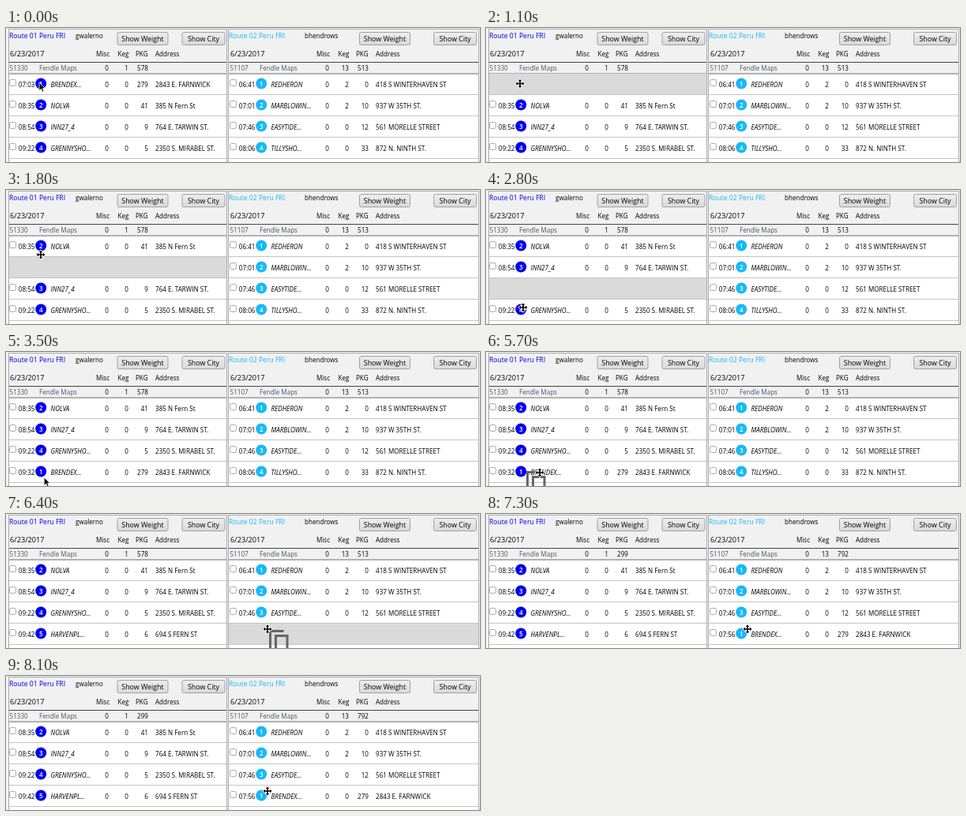
Recreate the animation shown at these times as an HTML page. Size 600 by 170 pixels, loop 8.2 s.

```html
<!DOCTYPE html>
<html lang="en">
<head>
<meta charset="utf-8">
<title>Route planner</title>
<style>
html, body { margin: 0; width: 100%; height: 100%; overflow: hidden; background: #fff; }
svg { display: block; font: 8.1px "Open Sans", "Noto Sans", sans-serif; fill: #000; }
.title { font-size: 8.6px; }
.button { font-size: 8.9px; }
.date { font-size: 9.2px; }
.sum { fill: #4b5560; }
.name { font-style: italic; }
.badge { font-size: 8px; font-weight: 600; fill: #fff; }
</style>
</head>
<body>
<svg id="stage" width="600" height="170" viewBox="0 0 600 170">
  <defs>
    <linearGradient id="face" x2="0" y2="1">
      <stop stop-color="#efefef"/><stop offset="1" stop-color="#d8d8d8"/>
    </linearGradient>
  </defs>
  <g id="view"></g>
</svg>
<script>
const LOOP = 8200, STEP = 100, ROW = 27, TOP = 58;
const view = document.getElementById('view');

// badge, name, packages, address, kegs
const stops = {
  a1: [1, 'BRENDEX...', 279, '2843 E. FARNWICK', 0],
  a2: [2, 'NOLVA', 41, '385 N Fern St', 0],
  a3: [3, 'INN27_4', 9, '764 E. TARWIN ST.', 0],
  a4: [4, 'GRENNYSHO...', 5, '2350 S. MIRABEL ST.', 0],
  a5: [5, 'HARVENPL...', 6, '694 S FERN ST', 0],
  b1: [1, 'REDHERON', 0, '418 S WINTERHAVEN ST', 2],
  b2: [2, 'MARBLOWIN...', 10, '937 W 35TH ST.', 2],
  b3: [3, 'EASYTIDE...', 12, '561 MORELLE STREET', 0],
  b4: [4, 'TILLYSHO...', 33, '872 N. NINTH ST.', 0]
};
const clock = { a1: '07:03', a2: '08:35', a3: '08:54', a4: '09:22', a5: '09:42',
                b1: '06:41', b2: '07:01', b3: '07:46', b4: '08:06' };

// Row order per list from each moment on; "-" is the drop slot
const orders = [
  [0, 'a1 a2 a3 a4', 'b1 b2 b3 b4'],
  [1000, '- a2 a3 a4', 'b1 b2 b3 b4'],
  [1500, 'a2 - a3 a4', 'b1 b2 b3 b4'],
  [2300, 'a2 a3 - a4', 'b1 b2 b3 b4'],
  [2900, 'a2 a3 a4 -', 'b1 b2 b3 b4'],
  [3400, 'a2 a3 a4 a1', 'b1 b2 b3 b4'],
  [5800, 'a2 a3 a4 -', 'b1 b2 b3 b4'],
  [6200, 'a2 a3 a4 a5', 'b1 b2 b3 -'],
  [7000, 'a2 a3 a4 a5', 'b1 b2 b3 a1']
];

// Pointer path: time, x, y
const path = [
  [0, 42, 69], [1000, 43, 70], [1800, 44, 82], [2800, 47, 149], [3300, 48, 158],
  [4000, 49, 163], [4700, 50, 163], [5300, 66, 153], [5700, 68, 153],
  [6400, 331, 146], [LOOP, 331, 146]
];

const text = (x, y, s, cls = '', anchor = 'start', fill = '') =>
  `<text x="${x}" y="${y}" class="${cls}" text-anchor="${anchor}"${fill && ` fill="${fill}"`}>${s}</text>`;
const rect = (x, y, w, h, fill, more = '') =>
  `<rect x="${x}" y="${y}" width="${w}" height="${h}" fill="${fill}" ${more}/>`;
const button = (x, w, label) =>
  rect(x + .5, 5.5, w, 16, 'url(#face)', 'rx="2" stroke="#a2a2a2"') +
  text(x + w / 2 + .5, 17, label, 'button', 'middle');
const numbers = (x, y, values, cls) =>
  values.map((v, i) => text(x + 130 + 25 * i, y, v, cls, 'end')).join('');

function row(x, y, id, color, time) {
  const [badge, name, pkg, address, keg] = stops[id];
  return rect(x + 4.5, y + 7.5, 8, 8, '#fff', 'rx="2" stroke="#a8a8a8"') +
    text(x + 15.8, y + 17, time) +
    `<circle cx="${x + 44.2}" cy="${y + 12.5}" r="7" fill="${color}"/>` +
    text(x + 44.2, y + 15.5, badge, 'badge', 'middle') +
    text(x + 56.5, y + 17, name, 'name') +
    numbers(x, y + 17, [0, keg, pkg]) +
    text(x + 189, y + 17, address);
}

function panel(p, order, total, moved) {
  const { x, left, w } = p;
  let out = rect(left, 2, w, 168, '#fff') + rect(left, 2, w, 55, '#f2f1f2') +
    text(left, 13, p.title, 'title', 'start', p.color) +
    text(p.userX, 13, p.user) +
    button(p.weightX, 64, 'Show Weight') + button(p.cityX, 54, 'Show City') +
    text(x + 5, 36, '6/23/2017', 'date') +
    text(x + 131, 36, 'Misc', '', 'end') + text(x + 141.5, 36, 'Keg') +
    text(x + 164, 36, 'PKG') + text(x + 189, 36, 'Address') +
    rect(left, 43, w, 1, '#444') +
    text(x + 4.5, 54, p.code, 'sum') + text(x + 42, 54, 'Fendle Maps', 'sum') +
    numbers(x, 54, [0, p.keg, total]) +
    rect(left, 57.5, w, 1, '#666');
  order.split(' ').forEach((id, i) => {
    const y = TOP + i * ROW;
    out += id === '-' ? rect(left, y, w, ROW, '#dadada')
                      : row(x, y, id, p.color, id === 'a1' ? moved : clock[id]);
    out += rect(left, y + ROW - 1, w, 1, '#c4c4c4');
  });
  return out + rect(left - 1, 1, 1, 169, '#aaa') + rect(left, 1, w, 1, '#aaa') +
    rect(left + w, 1, 1, 169, '#aaa');
}

const panels = [
  { x: 0, left: 4, w: 275, title: 'Route 01 Peru FRI', color: '#0000ee', user: 'gwalerno', userX: 88,
    weightX: 140.5, cityX: 222.5, code: '51330', keg: 1 },
  { x: 279, left: 282, w: 316, title: 'Route 02 Peru FRI', color: '#18b8fa', user: 'bhendrows', userX: 378,
    weightX: 447, cityX: 541, code: '51107', keg: 13 }
];

function pointer(t) {
  const i = path.findIndex((p, n) => t < path[n + 1][0]);
  const [t0, x0, y0] = path[i], [t1, x1, y1] = path[i + 1];
  const u = (t - t0) / (t1 - t0), e = u * u * (3 - 2 * u);
  return [x0 + (x1 - x0) * e, y0 + (y1 - y0) * e];
}

const arrow = '<path d="M0 0V10.5L2.5 8.3L4.2 12L6 11.2L4.4 7.6H7.6Z" fill="#000" stroke="#fff" stroke-width=".8"/>';
const cross = '<path d="M0-5.5L2.2-3H.8V-.8H3V-2.2L5.5 0L3 2.2V.8H.8V3H2.2L0 5.5L-2.2 3H-.8V.8H-3V2.2L-5.5 0L-3-2.2V-.8H-.8V-3H-2.2Z" ' +
  'fill="#000" stroke="#fff" stroke-width="1.6" paint-order="stroke"/>';
const copies = '<path d="M1.5 24V1.5H18.5M8.5 30V7.5H23V30" fill="none" stroke="#666" stroke-width="3"/>';

function draw(t) {
  const [, a, b] = orders.filter(o => o[0] <= t).pop();
  const [x, y] = pointer(t);
  const done = t >= 7000;
  const at = (dx, dy, shape) => `<g transform="translate(${x + dx} ${y + dy})">${shape}</g>`;
  const lag = Math.min(1, Math.max(0, (t - 5700) / 600));
  const plain = t < 1000 || (t >= 3500 && t < 5300);
  view.innerHTML = rect(0, 0, 600, 170, '#f4f4f4') +
    panel(panels[0], a, done ? 299 : 578, t < 3400 ? clock.a1 : '09:32') +
    panel(panels[1], b, done ? 792 : 513, '07:56') +
    (t >= 5600 && !done ? at(-17 + 19 * lag, -2 + 3 * lag, copies) : '') +
    at(0, 0, plain ? arrow : cross);
}

let last = -1;
function tick(now) {
  const t = Math.floor(now % LOOP / STEP) * STEP;
  if (t !== last) draw(last = t);
  requestAnimationFrame(tick);
}
draw(0);
requestAnimationFrame(tick);
</script>
</body>
</html>
```
